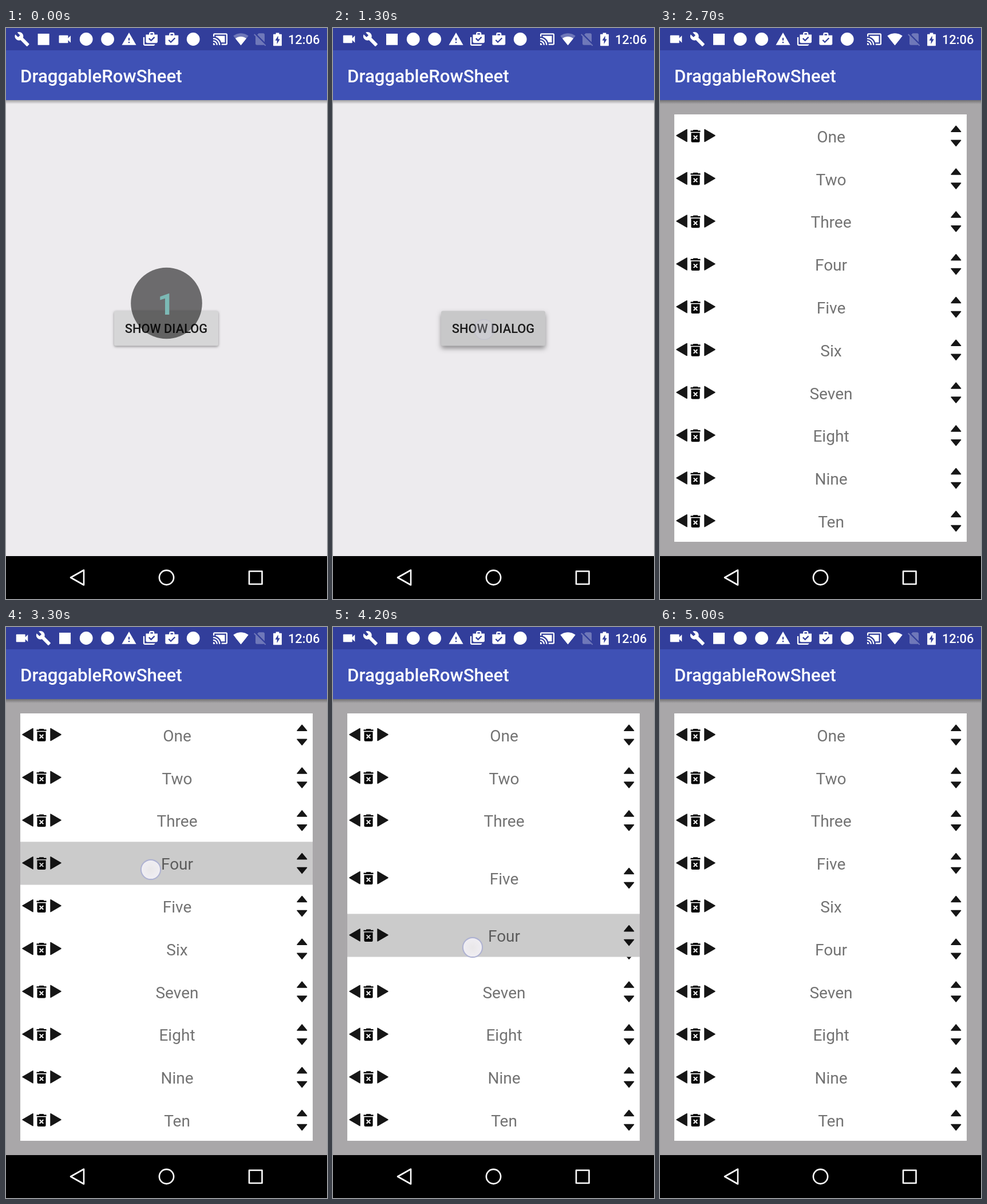
Write an HTML page with a canvas that moves like this. It is 561 px wide and 998 px high and loops after 5100 ms.

```html
<!DOCTYPE html>
<html lang="en">
<head>
<meta charset="utf-8">
<title>Draggable list dialog</title>
<style>
  html, body { margin: 0; width: 100%; height: 100%; overflow: hidden; background: #000; }
  canvas { display: block; }
</style>
</head>
<body>
<canvas id="stage" width="561" height="998"></canvas>
<script>
const ctx = document.getElementById('stage').getContext('2d');
const LOOP = 5100, TICK = 100;
const ROW_TOP = 151, ROW_H = 74.8, LEFT = 25, RIGHT = 536;
const NAMES = ['One', 'Two', 'Three', 'Four', 'Five', 'Six', 'Seven', 'Eight', 'Nine', 'Ten'];
const DRAGGED = 3;

// Vertical travel of the dragged row and of the finger, one value per tick.
const DRAG_START = 3800;
const ROW_TRAVEL = [8, 24, 47, 88, 126, 163, 192, 212, 222, 224, 187, 152.5];
const TOUCH_TRAVEL = [14, 36, 62, 101, 136, 172, 198, 217, 225, 226];

// Icons on a 24 unit grid, filled with the even-odd rule.
const ICONS = {
  wrench: 'M22.7 19l-9.1-9.1c.9-2.3.4-5-1.5-6.9-2-2-5-2.4-7.4-1.3L9 6 6 9 1.6 4.7C.4 7.1.9 10.1 2.9 12.1c1.9 1.9 4.6 2.4 6.9 1.5l9.1 9.1c.4.4 1 .4 1.4 0l2.3-2.3c.5-.4.5-1.1.1-1.4z',
  square: 'M3.4 3.6h17.6v17.4h-17.6z',
  video: 'M17 10.5V7c0-.55-.45-1-1-1H4c-.55 0-1 .45-1 1v10c0 .55.45 1 1 1h12c.55 0 1-.45 1-1v-3.5l4 4v-11l-4 4z',
  disc: 'M2 12a10 10 0 1 0 20 0a10 10 0 1 0 -20 0z',
  warning: 'M1 21h22L12 2zM13 18h-2v-2h2zM13 14h-2v-4h2z',
  bags: 'M3 9H1v11c0 1.1.9 2 2 2h14c1.1 0 2-.9 2-2H3zM18 5V3c0-1.1-.9-2-2-2h-4c-1.1 0-2 .9-2 2v2H5v11c0 1.1.9 2 2 2h14c1.1 0 2-.9 2-2V5zM12 3h4v2h-4zM13 15.5l-4-4 1.4-1.4 2.6 2.6 4.6-4.6 1.4 1.4z',
  bag: 'M16 6V4c0-1.1-.9-2-2-2h-4c-1.1 0-2 .9-2 2v2H2v13c0 1.1.9 2 2 2h16c1.1 0 2-.9 2-2V6zM10 4h4v2h-4zM10.5 18l-4-4 1.4-1.4 2.6 2.6 5.6-5.6 1.4 1.4z',
  cast: 'M21 3H3c-1.1 0-2 .9-2 2v3h2V5h18v14h-7v2h7c1.1 0 2-.9 2-2V5c0-1.1-.9-2-2-2zM1 18v3h3c0-1.7-1.3-3-3-3zM1 14v2c2.8 0 5 2.2 5 5h2c0-3.9-3.1-7-7-7zM1 10v2c5 0 9 4 9 9h2c0-6.1-4.9-11-11-11zM19 7H5v1.6c4 1.3 7.1 4.4 8.4 8.4H19z',
  wifi: 'M12 21.5L23.6 7C23.2 6.7 18.7 3 12 3S.8 6.7.4 7z',
  wifiWeak: 'M12 21.5L20.5 11C20 10.6 16.8 8 12 8s-8 2.6-8.5 3z',
  noSim: 'M19 5c0-1.1-.9-2-2-2h-7L7.7 5.3 19 16.7zM3.6 3.9L2.4 5.1 5 7.8V19c0 1.1.9 2 2 2h10c.3 0 .7-.1 1-.3l1.9 1.9 1.2-1.2z',
  battery: 'M9.5 2.4h5v2h3.4q.6 0 .6.6v16.6q0 .6-.6.6H6.1q-.6 0-.6-.6V5q0-.6.6-.6h3.4zM13 6.8L8.5 14h2.7v5.5l4.5-7.5H13z'
};
for (const name in ICONS) ICONS[name] = new Path2D(ICONS[name]);

function icon(name, x, alpha = 1) {
  ctx.save();
  ctx.translate(x, 19.5);
  ctx.scale(1.14, 1.14);
  ctx.translate(-12, -12);
  ctx.globalAlpha = alpha;
  ctx.fillStyle = '#fff';
  ctx.fill(ICONS[name], 'evenodd');
  ctx.restore();
}

function rect(x, y, w, h, color) {
  ctx.fillStyle = color;
  ctx.fillRect(x, y, w, h);
}

function label(text, x, y, size, color, weight = 400, align = 'center') {
  ctx.font = `${weight} ${size}px Roboto, sans-serif`;
  ctx.textAlign = align;
  ctx.fillStyle = color;
  ctx.fillText(text, x, y);
}

function disc(x, y, r) {
  ctx.beginPath();
  ctx.arc(x, y, r, 0, Math.PI * 2);
}

function polygon(...points) {
  ctx.beginPath();
  for (let i = 0; i < points.length; i += 2) ctx.lineTo(points[i], points[i + 1]);
  ctx.closePath();
}

const clamp = v => Math.min(1, Math.max(0, v));
const ease = p => 0.5 - 0.5 * Math.cos(Math.PI * clamp(p));

function drawBars(t) {
  rect(0, 0, 561, 39, '#323e9b');
  rect(0, 39, 561, 87, '#3f51b5');
  const shadow = ctx.createLinearGradient(0, 126, 0, 133);
  shadow.addColorStop(0, 'rgba(0,0,0,.32)');
  shadow.addColorStop(1, 'rgba(0,0,0,0)');
  rect(0, 126, 561, 7, shadow);
  label('DraggableRowSheet', 25, 95, 31.2, '#fff', 500, 'left');

  const first = t < 300 ? ['wrench', 'square', 'video'] : ['video', 'wrench', 'square'];
  [...first, 'disc', 'disc', 'warning', 'bags', 'bag', 'disc']
    .forEach((name, i) => icon(name, 28 + i * 37.4));
  icon('cast', 374.5);
  icon('wifi', 410.5, t < 2700 ? 0.3 : 1);
  icon('wifiWeak', 410.5);
  icon('noSim', 444, 0.3);
  icon('battery', 474.5);
  label('12:06', 548.5, 28, 21.9, '#fff', 500, 'right');

  rect(0, 923, 561, 75, '#000');
  ctx.strokeStyle = '#fff';
  ctx.lineWidth = 2.6;
  ctx.lineJoin = 'round';
  polygon(113, 960.5, 136, 947.5, 136, 973.5);
  ctx.stroke();
  disc(280.5, 960.5, 12.6);
  ctx.stroke();
  ctx.strokeRect(425, 949.5, 22.5, 22.5);
}

function drawButton(t) {
  const press = clamp((t - 900) / 400);
  const shade = Math.round(214 - 14 * press);
  ctx.save();
  ctx.shadowColor = 'rgba(0,0,0,.4)';
  ctx.shadowBlur = 4 + 5 * press;
  ctx.shadowOffsetY = 1.5 + 3 * press;
  ctx.fillStyle = `rgb(${shade},${shade},${shade + 1})`;
  ctx.beginPath();
  ctx.roundRect(189, 494.5, 182, 61, 3);
  ctx.fill();
  ctx.restore();
  label('SHOW DIALOG', 280, 533, 21.8, '#1a1a1a', 500);
}

function drawCountdown(t) {
  ctx.save();
  ctx.globalAlpha = clamp(1 - t / 400);
  disc(280.5, 481, 62.3);
  ctx.fillStyle = 'rgba(0,0,0,.54)';
  ctx.fill();
  label('1', 280, 501, 52, '#7cb9b5', 700);
  ctx.restore();
}

function drawRow(name, top, selected) {
  ctx.save();
  ctx.translate(0, top);
  if (selected) rect(LEFT, 0, RIGHT - LEFT, ROW_H + 0.4, '#fff');

  ctx.fillStyle = ctx.strokeStyle = '#161616';
  ctx.lineWidth = 1.5;
  ctx.lineJoin = 'round';
  for (const shape of [
    [29, 37, 47, 26.5, 47, 47.5],
    [78, 26.5, 78, 47.5, 96, 37],
    [509, 30.3, 517.3, 20.3, 525.6, 30.3],
    [509, 45.2, 525.6, 45.2, 517.3, 55.2]
  ]) {
    polygon(...shape);
    ctx.fill();
    ctx.stroke();
  }

  rect(53.5, 28.3, 17, 2.4, '#000');
  rect(58, 27, 8, 2, '#000');
  ctx.beginPath();
  ctx.roundRect(54.5, 32.3, 15, 16.4, [0, 0, 2, 2]);
  ctx.fill();
  ctx.strokeStyle = '#fff';
  ctx.lineWidth = 2;
  ctx.beginPath();
  ctx.moveTo(58.7, 37); ctx.lineTo(65.3, 43.6);
  ctx.moveTo(65.3, 37); ctx.lineTo(58.7, 43.6);
  ctx.stroke();

  label(name, 299, 48.7, 28.05, '#737373');
  if (selected) rect(LEFT, 0, RIGHT - LEFT, ROW_H + 0.4, 'rgba(2,0,2,.205)');
  ctx.restore();
}

function drawDialog(t) {
  rect(0, 126, 561, 797, '#a9a7a9');
  rect(LEFT, ROW_TOP, RIGHT - LEFT, 747, '#fff');
  const selected = t >= 3300 && t < 5000;
  const slotTop = i => ROW_TOP + i * ROW_H;

  NAMES.forEach((name, i) => {
    if (i === DRAGGED) return;
    let slot = i;
    if (i === 4) slot -= ease((t - 4050) / 250);
    if (i === 5) slot -= ease((t - 4270) / 250);
    drawRow(name, slotTop(slot), false);
  });

  let top = slotTop(DRAGGED);
  if (t >= 5000) top = slotTop(5);
  else if (t >= DRAG_START) top += ROW_TRAVEL[(t - DRAG_START) / TICK];
  drawRow(NAMES[DRAGGED], top, selected);
}

function drawTouch(x, y, alpha) {
  ctx.save();
  ctx.globalAlpha = alpha;
  const fill = ctx.createRadialGradient(x, y, 0, x, y, 17);
  fill.addColorStop(0, '#e9e7e9');
  fill.addColorStop(1, '#f0eef3');
  disc(x, y, 17);
  ctx.fillStyle = fill;
  ctx.shadowColor = 'rgba(150,155,200,.5)';
  ctx.shadowBlur = 3;
  ctx.fill();
  ctx.shadowBlur = 0;
  ctx.strokeStyle = '#adb1d2';
  ctx.lineWidth = 1.8;
  ctx.stroke();
  ctx.restore();
}

function drawFinger(t) {
  if (t >= 1000 && t < 1400) {
    drawTouch(264, 527, [0.9, 0.9, 0.6, 0.2][(t - 1000) / TICK]);
  } else if (t >= 2800 && t < 4800) {
    const step = (t - DRAG_START) / TICK;
    const x = 253 - 9 * clamp(step / 4) - clamp((step - 4) / 5);
    drawTouch(x, 424 + (step < 0 ? 0 : TOUCH_TRAVEL[step]), t < 4700 ? 1 : 0.75);
  }
}

function draw(now) {
  const t = Math.floor((now % LOOP) / TICK) * TICK;
  rect(0, 0, 561, 998, '#edebee');
  if (t < 1400) {
    drawButton(t);
    drawCountdown(t);
  } else {
    drawDialog(t);
  }
  drawBars(t);
  drawFinger(t);
}

const start = performance.now();
function loop() {
  draw(performance.now() - start);
  requestAnimationFrame(loop);
}
loop();
</script>
</body>
</html>
```
